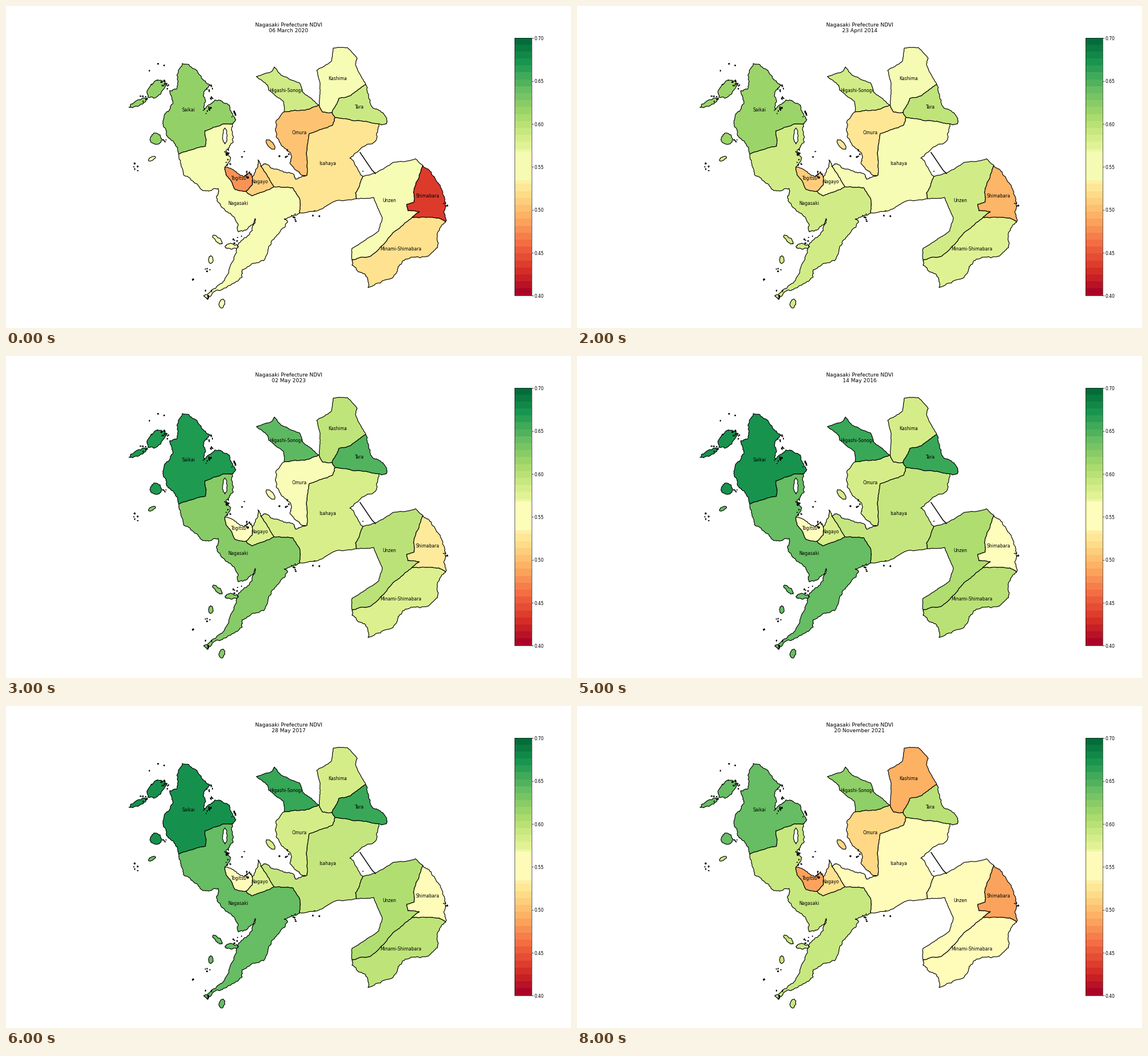
A matplotlib script that plays this animation: 991 px wide and 565 px high, repeating every 9000 ms.

```python
import numpy as np
import matplotlib.pyplot as plt
from matplotlib.animation import FuncAnimation
from matplotlib.colors import Normalize
from matplotlib.patches import Polygon

W, H, DPI = 991, 565, 55
LOW, HIGH, BANDS = 0.40, 0.70, 37
PALE = (0.534, 0.5675)
rng = np.random.default_rng(12)


def arc(*xy, rough=0.38):
    """Polyline through key points, broken up by midpoint displacement."""
    p = np.reshape(xy, (-1, 2)).astype(float)
    while True:
        d = np.diff(p, axis=0)
        size = np.hypot(*d.T)[:, None]
        if size.max() < 4:
            return p
        normal = np.c_[-d[:, 1], d[:, 0]] / size
        fine = np.empty((2 * len(p) - 1, 2))
        fine[::2] = p
        fine[1::2] = p[:-1] + d / 2 + normal * rng.uniform(-rough, rough, size.shape) * size ** 0.6
        p = fine


def border(*xy):
    return arc(*xy, rough=0.18)


def blob(x, y, rx, ry, tilt=0, rough=0.45):
    """Ragged ellipse, tilt in degrees."""
    t, a = np.linspace(0, 2 * np.pi, 9), np.radians(tilt)
    u, v = rx * np.cos(t), ry * np.sin(t)
    return arc(*np.c_[x + u * np.cos(a) - v * np.sin(a),
                      y + u * np.sin(a) + v * np.cos(a)].ravel(), rough=rough)


def ring(*arcs):
    return np.vstack(arcs)


# Inland borders
saikai_nagasaki = border(303, 260, 350, 246, 349, 219, 379, 208, 397, 207)
nagasaki_isahaya = border(515, 363, 515, 338, 503, 319, 470, 317)
nagasaki_nagayo = border(470, 317, 431, 333, 421, 325)
nagasaki_togitsu = border(421, 325, 402, 322, 397, 311, 386, 296, 384, 283)
togitsu_nagayo = border(432, 300, 432, 314, 421, 325)
nagayo_isahaya = border(447, 281, 458, 297, 470, 317)
sonogi_omura = border(549, 174, 524, 183, 488, 186)
kashima_omura = border(549, 174, 555, 186, 572, 187)
kashima_tara = border(631, 138, 605, 157, 584, 162, 572, 187)
tara_omura = border(572, 187, 577, 196)
tara_isahaya = border(654, 207, 608, 201, 577, 196)
omura_isahaya = border(577, 196, 573, 209, 532, 224, 528, 249, 528, 297)
isahaya_unzen = border(626, 299, 613, 328, 615, 338)
unzen_shimabara = border(731, 280, 716, 320, 716, 344, 703, 348, 705, 359, 725, 361, 712, 371)
shimabara_minami = border(712, 371, 759, 372, 771, 379)
unzen_minami = border(712, 371, 686, 393, 654, 427, 637, 440, 607, 445)

# Coasts
saikai_coast = arc(303, 260, 294, 238, 284, 230, 275, 206, 280, 188, 292, 172, 287, 149,
                   299, 146, 301, 130, 309, 101, 332, 111, 346, 130, 361, 139, 347, 152,
                   348, 182, 366, 165, 392, 174, 403, 199, 397, 207)
nagasaki_west = arc(303, 260, 311, 295, 345, 324, 372, 320, 369, 334, 381, 355, 403, 376,
                    407, 396, 421, 393, 437, 373, 432, 394, 408, 416, 402, 436, 384, 478,
                    347, 508, 353, 514, 364, 502)
nagasaki_south = arc(364, 502, 394, 490, 414, 476, 414, 463, 452, 447, 466, 412, 494, 379,
                     488, 374, 515, 363)
nagasaki_bay = arc(384, 283, 394, 266, 386, 254, 398, 240, 397, 207)
togitsu_coast = arc(384, 283, 417, 300, 427, 291, 432, 300)
nagayo_coast = arc(432, 300, 440, 285, 442, 270, 447, 281)
isahaya_bay = arc(447, 281, 456, 277, 470, 286, 505, 296, 508, 304, 528, 297)
isahaya_east = arc(654, 207, 650, 234, 603, 267, 626, 299)
isahaya_south = border(615, 338, 578, 342, 549, 358, 515, 363)
sonogi_north = border(439, 124, 467, 114, 471, 107, 482, 121, 515, 135, 521, 152, 549, 174)
sonogi_west = border(488, 186, 487, 168, 461, 148, 459, 139, 439, 124)
kashima_edge = border(549, 174, 551, 147, 545, 113, 571, 96, 574, 74, 599, 73, 616, 92,
                      613, 102, 631, 138)
tara_coast = arc(631, 138, 646, 180, 667, 196, 667, 207, 654, 207)
omura_coast = arc(488, 186, 474, 201, 474, 230, 499, 258, 498, 276, 520, 297, 528, 297)
unzen_north = border(626, 299, 648, 293, 678, 275, 718, 268, 731, 280)
unzen_west = border(615, 338, 645, 336, 660, 372, 654, 394, 628, 412, 607, 425, 607, 445)
shimabara_coast = arc(731, 280, 746, 292, 769, 335, 768, 362, 771, 379)
minami_coast = arc(771, 379, 758, 396, 757, 424, 737, 440, 696, 447, 678, 477, 635, 494,
                   630, 471, 607, 455, 607, 445)

# name: label centre, then outlines
REGIONS = {
    "Saikai": ((320, 182), [
        ring(saikai_coast, saikai_nagasaki[::-1]),
        blob(263, 146, 20, 12, -45), blob(232, 170, 18, 5, -25), blob(263, 233, 10, 10)]),
    "Nagasaki": ((407, 346), [
        ring(nagasaki_west, nagasaki_south, nagasaki_isahaya, nagasaki_nagayo,
             nagasaki_togitsu, nagasaki_bay, saikai_nagasaki[::-1]),
        blob(396, 422, 12, 5), blob(371, 410, 11, 4, 45), blob(359, 445, 4, 7),
        blob(379, 522, 5, 8, 15), blob(256, 268, 7, 3, -30)]),
    "Togitsu": ((409, 302), [ring(togitsu_coast, togitsu_nagayo, nagasaki_togitsu)]),
    "Nagayo": ((444.5, 308), [
        ring(nagayo_coast, nagayo_isahaya, nagasaki_nagayo, togitsu_nagayo[::-1])]),
    "Higashi-Sonogi": ((491, 148), [ring(sonogi_north, sonogi_omura, sonogi_west)]),
    "Kashima": ((582, 127), [ring(kashima_edge, kashima_tara, kashima_omura[::-1])]),
    "Tara": ((620, 177), [
        ring(tara_coast, tara_isahaya, tara_omura[::-1], kashima_tara[::-1])]),
    "Omura": ((515, 222), [
        ring(omura_coast, omura_isahaya[::-1], tara_omura[::-1], kashima_omura[::-1],
             sonogi_omura),
        blob(464, 243, 11, 5, 50, rough=0.2)]),
    "Isahaya": ((564, 276), [
        ring(isahaya_bay, omura_isahaya[::-1], tara_isahaya[::-1], isahaya_east,
             isahaya_unzen, isahaya_south, nagasaki_isahaya, nagayo_isahaya[::-1])]),
    "Unzen": ((672, 341), [
        ring(unzen_north, unzen_shimabara, unzen_minami, unzen_west[::-1],
             isahaya_unzen[::-1])]),
    "Shimabara": ((739, 333), [
        ring(unzen_shimabara, shimabara_minami, shimabara_coast[::-1])]),
    "Minami-Shimabara": ((692, 426), [
        ring(shimabara_minami, minami_coast, unzen_minami[::-1])]),
}

# Day of year: mean NDVI in the order of REGIONS; other days are interpolated
NDVI = {
    66: (.619, .556, .478, .511, .586, .556, .588, .503, .525, .556, .436, .523),
    113: (.615, .584, .508, .555, .585, .558, .595, .526, .557, .584, .494, .575),
    122: (.668, .624, .550, .576, .643, .595, .648, .555, .581, .598, .529, .577),
    134: (.673, .640, .548, .580, .657, .582, .657, .582, .592, .604, .548, .599),
    292: (.682, .632, .542, .545, .671, .582, .657, .579, .592, .592, .523, .575),
    324: (.640, .590, .485, .522, .621, .492, .599, .515, .547, .547, .485, .547),
}
DATES = [(66, "06 March 2020"), (99, "09 April 2018"), (113, "23 April 2014"),
         (122, "02 May 2023"), (128, "08 May 2019"), (134, "14 May 2016"),
         (148, "28 May 2017"), (292, "19 October 2015"), (324, "20 November 2021")]


def ndvi(day):
    return [np.interp(day, list(NDVI), track) for track in zip(*NDVI.values())]


cmap, norm = plt.get_cmap("RdYlGn"), Normalize(LOW, HIGH)
fig = plt.figure(figsize=((W + 0.01) / DPI, (H + 0.01) / DPI), dpi=DPI, facecolor="white")
ax = fig.add_axes([0, 0, 1, 1])
ax.set(xlim=(0, W), ylim=(H, 0))
ax.axis("off")


def shape(xy, fill, width=1.5):
    return ax.add_patch(Polygon(xy, facecolor=fill, edgecolor="black", lw=width,
                                joinstyle="round"))


patches = [[shape(xy, "white") for xy in outlines] for _, outlines in REGIONS.values()]
shape(blob(384, 228, 4, 14, rough=0.25), "white")
ax.plot([621, 642, 648], [257, 288, 294], color="black", lw=2)

# Loose groups of islets: x, y, spread, count
ISLETS = [(355, 181, 3.5, 9), (424, 296, 3, 9), (365, 162, 3, 5), (387, 256, 3, 7),
          (278, 138, 5, 12), (260, 117, 11, 5), (244, 163, 4, 6), (228, 281, 4, 5),
          (279, 234, 2.5, 4), (399, 190, 3, 6), (490, 260, 4, 5), (357, 146, 3, 5),
          (405, 411, 4, 6), (328, 481, 1.5, 3), (355, 460, 4, 4), (772, 348, 2, 5),
          (506, 369, 4, 6), (357, 506, 4, 5), (391, 275, 3, 5), (420, 262, 5, 2),
          (545, 364, 4, 3), (626, 290, 0, 1)]
for x, y, spread, count in ISLETS:
    for cx, cy in rng.normal((x, y), spread, (count, 2)):
        shape(blob(cx, cy, *rng.uniform(0.4, 1.6, 2)), "black", 1)

for name, ((x, y), _) in REGIONS.items():
    ax.text(x, y + 2.8, name, size=10, ha="center", va="baseline")
title = ax.text(W / 2, 46.2, "", size=12, ha="center", va="baseline")

# Colour bar
cax = fig.add_axes([0.9, 0.1, 0.03, 0.8])
levels = np.linspace(LOW, HIGH, 452)
step = (HIGH - LOW) / BANDS
banded = LOW + (np.minimum((levels - LOW) // step, BANDS - 1) + 0.5) * step
middle = (levels > PALE[0]) & (levels < PALE[1])
bar = cax.imshow(banded[:, None], cmap=cmap, norm=norm, origin="lower", aspect="auto",
                 extent=(0, 1, LOW, HIGH), interpolation="nearest")
cax.set_xticks([])
cax.yaxis.tick_right()
cax.set_yticks(np.linspace(LOW, HIGH, 7))
cax.yaxis.set_major_formatter("{x:.2f}")


def update(i):
    day, date = DATES[i]
    values = ndvi(day)
    title.set_text(f"Nagasaki Prefecture NDVI\n{date}")
    for group, value in zip(patches, values):
        for patch in group:
            patch.set_facecolor(cmap(norm(value)))
    pale = [v for v in values if PALE[0] < v < PALE[1]]
    bar.set_data(np.where(middle, np.mean(pale), banded)[:, None])
    return []


anim = FuncAnimation(fig, update, frames=len(DATES), interval=1000, repeat=True,
                     repeat_delay=0, blit=False)
plt.show()
```
